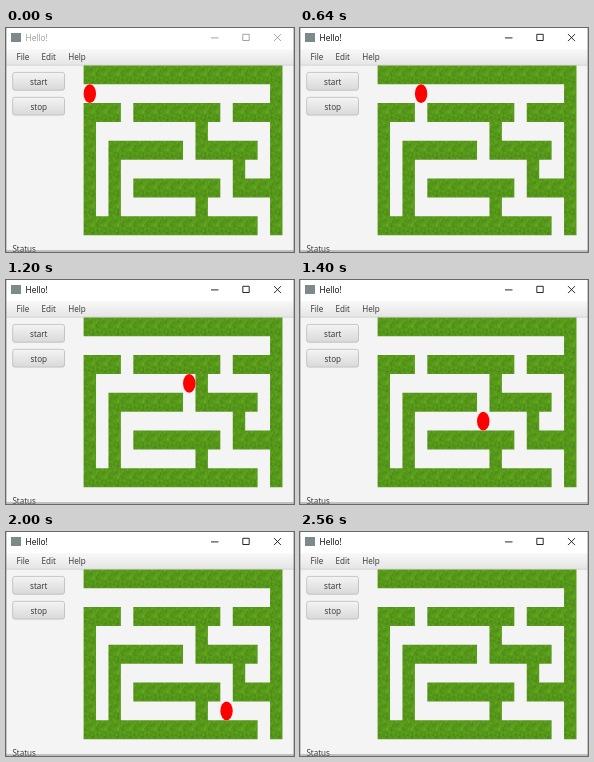
Write an HTML page that moves like this. It is 288 px wide and 224 px high and loops after 3.28 s.

```html
<!DOCTYPE html>
<html lang="en">
<head>
<meta charset="utf-8">
<title>Maze</title>
<style>
  html, body { margin: 0; width: 100%; height: 100%; overflow: hidden; background: #f4f4f4; }
  svg { display: block; width: 100vw; height: 100vh; }
  text { font: 8.1px "Open Sans", "Noto Sans", sans-serif; fill: #333; }
</style>
</head>
<body>
<svg viewBox="0 0 288 224">
  <defs>
    <linearGradient id="bar" x2="0" y2="1">
      <stop stop-color="#f8f8f8"/><stop offset="1" stop-color="#e5e5e5"/>
    </linearGradient>
    <linearGradient id="face" x2="0" y2="1">
      <stop stop-color="#f4f4f4"/><stop offset="1" stop-color="#d9d9d9"/>
    </linearGradient>
    <pattern id="grass" patternUnits="userSpaceOnUse"></pattern>
  </defs>

  <rect width="288" height="224" fill="#f4f4f4"/>
  <rect width="288" height="21.5" fill="#fff"/>
  <rect x="5" y="5" width="10" height="9" fill="#7d8a8c"/>
  <text id="title" x="19.6" y="12.8" style="font-size:8.3px">Hello!</text>
  <path id="controls" d="M205 9.9h7.5M236.8 6.3h6.4v6.2h-6.4zM268 6.1l7 7M275 6.1l-7 7" fill="none" stroke-width=".9"/>

  <rect y="21.5" width="288" height="15.5" fill="url(#bar)"/>
  <path d="M0 37.2h288" stroke="#c9c9c9" stroke-width=".7"/>
  <text x="10.6" y="32.3">File</text>
  <text x="35.6" y="32.3">Edit</text>
  <text x="62.3" y="32.3">Help</text>

  <g id="buttons" text-anchor="middle"></g>
  <text x="6.4" y="223.6">Status</text>
  <path d="M0 223h288" stroke="#808080" stroke-width=".9"/>
  <path d="M.3 0v224M287.6 0v224" stroke="#999" stroke-width=".6"/>

  <path id="walls" fill="url(#grass)"/>
  <ellipse id="ball" fill="#f00"/>
</svg>
<script>
const LOOP = 3280, FOCUS = 520;
const X0 = 77.6, Y0 = 37.4, W = 12.43, H = 18.86;
const MAZE = [
  '################',
  '...............#',
  '###.#######.####',
  '#........#.....#',
  '#.######.#####.#',
  '#.#.........#..#',
  '#.#.#######.####',
  '#.#......#.....#',
  '##############.#'
];
const ROUTE = 'RRRDDRRRRRDDRRRDDRRRD';
const $ = id => document.getElementById(id);

function set(el, attrs) {
  for (const key in attrs) el.setAttribute(key, attrs[key]);
}

function add(parent, name, attrs) {
  const el = document.createElementNS('http://www.w3.org/2000/svg', name);
  set(el, attrs);
  parent.appendChild(el);
  return el;
}

let seed = 17;
function random() {
  seed = (seed * 16807) % 2147483647;
  return seed / 2147483647;
}

function drawGrass() {
  const tile = $('grass');
  set(tile, { x: X0, y: Y0, width: W, height: H });
  add(tile, 'rect', { width: W, height: H, fill: '#55981a' });
  for (let i = 0; i < 85; i++) {
    const x = random() * W, y = random() * H;
    const dx = (random() - .5) * 2, dy = 1 + random() * 1.6;
    const hue = 84 + random() * 12, light = 25 + random() * 19;
    add(tile, 'path', {
      d: `M${x} ${y}l${dx} ${-dy}`,
      stroke: `hsl(${hue} 72% ${light}%)`,
      'stroke-width': .7
    });
  }
}

function drawWalls() {
  let d = '';
  MAZE.forEach((row, r) => {
    for (const run of row.matchAll(/#+/g)) {
      d += `M${X0 + run.index * W} ${Y0 + r * H}h${run[0].length * W}v${H}h${-run[0].length * W}z`;
    }
  });
  $('walls').setAttribute('d', d);
}

function drawButton(label, y) {
  const group = $('buttons');
  add(group, 'rect', {
    x: 6.7, y, width: 51.8, height: 17.8, rx: 2.2,
    fill: 'url(#face)', stroke: '#bababa', 'stroke-width': .8
  });
  add(group, 'text', { x: 32.8, y: y + 12.2 }).textContent = label;
}

// The first moves come quickly, then the pace settles.
const stepTime = n => n < 7 ? 460 + 60 * n : 120 + 105 * n;

function draw(t) {
  const active = t >= FOCUS;
  $('title').style.fill = active ? '#000' : '#999';
  $('controls').setAttribute('stroke', active ? '#111' : '#999');

  let n = 0;
  while (n <= ROUTE.length && t >= stepTime(n + 1)) n++;
  const gone = n > ROUTE.length;
  const moves = ROUTE.slice(0, n);
  const col = moves.split('R').length - 1;
  const row = moves.split('D').length;
  set($('ball'), {
    cx: X0 + (col + .5) * W, cy: Y0 + (row + .5) * H,
    rx: W / 2, ry: H / 2,
    visibility: gone ? 'hidden' : 'visible'
  });
}

drawGrass();
drawWalls();
drawButton('start', 44.4);
drawButton('stop', 69.3);

const start = performance.now();
function tick() {
  draw((performance.now() - start) % LOOP);
  requestAnimationFrame(tick);
}
tick();
</script>
</body>
</html>
```
